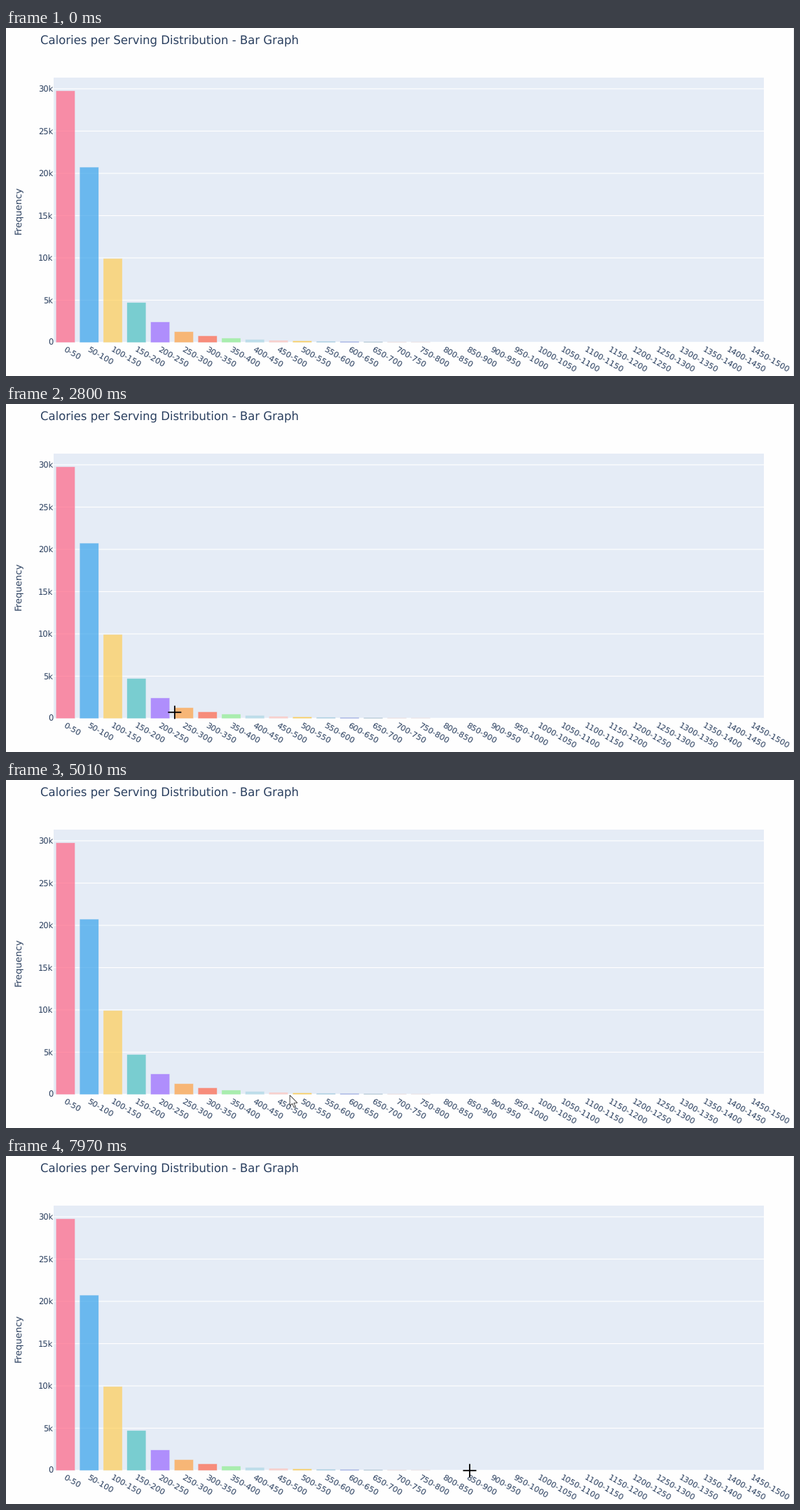
Animation, 1125 px wide and 498 px high, one loop 8 s. Source, as a matplotlib script:

```python
import math

import matplotlib.pyplot as plt
import numpy as np
from matplotlib.animation import FuncAnimation
from matplotlib.colors import to_rgb
from matplotlib.patches import Polygon, Rectangle

plt.rcParams["text.hinting"] = "none"

W, H, DPI = 1125, 498, 96
LOOP, STEP = 8000, 40

LEFT, RIGHT, TOP, BASE = 68, 1082, 71, 450
BINS = 30
SLOT = (RIGHT - LEFT) / BINS
HALF = 0.4 * SLOT
PX_PER_UNIT = 12.1 / 1000

PLOT_BG = "#e5ecf6"
INK = "#2a3f5f"
HOVER_INK = "#444444"
OPACITY = 0.7

COLORS = ["#ff6384", "#36a2eb", "#ffce56", "#4bc0c0", "#9966ff", "#ff9f40",
          "#ff6347", "#90ee90", "#add8e6", "#ffc4bc", "#ffc83c", "#87bcd6",
          "#6a7fd4", "#6f95a8", "#f0bcb0", "#f5c0a8"]
HEAD = [29759, 20732, 9924, 4718, 2418]
# The long tail falls off as a power law
COUNTS = HEAD + [round(1271 * (6 / n) ** 3.2)
                 for n in range(len(HEAD) + 1, len(COLORS) + 1)]

# Pointer moves: start ms, end ms, target x, target y, ease-out power, bow
ENTRY = (101, 494)
MOVES = [
    (880, 1220, 94, 432.5, 1, 0),
    (1410, 2210, 198, 432.5, 3.4, -13),
    (2230, 2960, 251, 443.3, 1, 0),
    (3060, 3640, 300, 446, 1, 0),
    (4030, 4830, 398, 451, 2.8, -4),
    (4930, 5720, 461, 451.3, 1, 0),
    (5820, 6170, 514, 448, 1, 0),
    (6560, 7350, 618, 450.9, 2.06, 0),
    (7380, 7970, 662, 450.2, 1, 0),
]
ARROW = np.array([(0, 0), (0, 15.2), (3.5, 12), (5.9, 17.4), (8.2, 16.4),
                  (5.8, 11.2), (10.8, 11)])
ARM = 9.5

fig = plt.figure(figsize=(W / DPI, H / DPI), dpi=DPI, facecolor="#fefefe")
ax = fig.add_axes([0, 0, 1, 1])
ax.set_xlim(0, W)
ax.set_ylim(H, 0)
ax.axis("off")


def pt(px):
    return px * 72 / DPI


def write(x, y, text, size, color=INK, font="DejaVu Sans", **kw):
    kw = {"ha": "left", "va": "baseline", **kw}
    return ax.text(x, y, text, fontsize=pt(size), color=color, family=font, **kw)


def line(xs, ys, color, width, z):
    return ax.plot(xs, ys, color=color, lw=pt(width), zorder=z, snap=False,
                   solid_capstyle="butt")[0]


def center(i):
    return LEFT + (i + 0.5) * SLOT


def bar_top(i):
    return BASE - COUNTS[i] * PX_PER_UNIT


def bin_name(i):
    return f"{50 * i}-{50 * (i + 1)}"


def draw_chart():
    ax.add_patch(Rectangle((LEFT, TOP), RIGHT - LEFT, BASE - TOP,
                           fc=PLOT_BG, lw=0, zorder=0))
    for k in range(0, 31, 5):
        y = BASE - k * 1000 * PX_PER_UNIT
        line([LEFT, RIGHT], [y, y], "white", 1.2 if k else 1.6, 1)
        write(67.3, y + 4.2, f"{k}k" if k else "0", 11.5, ha="right")
    for i, color in enumerate(COLORS):
        ax.add_patch(Rectangle((center(i) - HALF, bar_top(i)), 2 * HALF,
                               BASE - bar_top(i), fc=color, ec=PLOT_BG,
                               alpha=OPACITY, lw=pt(0.5), snap=False, zorder=2))
    for i in range(BINS):
        write(center(i) - 3.4, 461.5, bin_name(i), 11.45,
              rotation=-30, rotation_mode="anchor")
    write(49, 23, "Calories per Serving Distribution - Bar Graph", 16.5)
    write(22, 260.5, "Frequency", 13.3, ha="center",
          rotation=90, rotation_mode="anchor")
    line([W - 0.5] * 2, [0, H], "#e6e8ec", 1, 1)


def hover_label(i):
    """Callout box pointing at the top right corner of a bar."""
    n = COUNTS[i]
    value = f"{n / 1000:.3f}k" if n > 9772 else str(n)
    x, y = center(i) + HALF, bar_top(i)
    text = write(x + 8.7, y + 4.9, f"({bin_name(i)}, {value})", 12.5,
                 HOVER_INK, "Liberation Sans", zorder=6)
    width = text.get_window_extent(fig.canvas.get_renderer()).width + 6.5
    x0, x1 = x + 5.5, x + 5.5 + width
    fill = OPACITY * np.array(to_rgb(COLORS[i])) + (1 - OPACITY)
    box = Polygon([(x, y), (x0, y - 5), (x0, y - 10), (x1, y - 10),
                   (x1, y + 10.3), (x0, y + 10.3), (x0, y + 5)],
                  fc=fill, ec=HOVER_INK, lw=pt(1.1), zorder=5)
    ax.add_patch(box)
    for part in (box, text):
        part.set_visible(False)
    return box, text


def pointer(t):
    x, y = ENTRY
    for start, end, to_x, to_y, power, bow in MOVES:
        u = min(max((t - start) / (end - start), 0), 1)
        e = 1 - (1 - u) ** power
        x += (to_x - x) * e
        y += (to_y - y) * e + bow * math.sin(math.pi * e)
    return x, y


def hovered(x, y):
    i = int((x - LEFT) / SLOT)
    on_bar = i < len(labels) and abs(x - center(i)) < HALF - 1.5
    return i if on_bar and bar_top(i) <= y < BASE else None


draw_chart()
labels = [hover_label(i) for i in range(len(COLORS))]
cross = [line([], [], "black", 1.8, 8) for _ in range(2)]
arrow = ax.add_patch(Polygon(ARROW, fc="white", ec="#333333", lw=pt(0.9),
                             joinstyle="miter", zorder=8))


def update(frame):
    t = (frame + 0.5) * STEP
    x, y = pointer(t)
    shown = t >= MOVES[0][0]
    inside = y <= BASE + 0.4

    cross[0].set_data([x - ARM, x + ARM], [y, y])
    cross[1].set_data([x, x], [y - ARM, y + ARM])
    for arm in cross:
        arm.set_visible(shown and inside)
    arrow.set_xy(ARROW + (x, y))
    arrow.set_visible(shown and not inside)

    active = hovered(x, y) if shown else None
    for i, parts in enumerate(labels):
        for part in parts:
            part.set_visible(i == active)
    return [*cross, arrow, *(p for parts in labels for p in parts)]


anim = FuncAnimation(fig, update, frames=LOOP // STEP, interval=STEP,
                     repeat=True, repeat_delay=0, blit=False)
plt.show()
```
